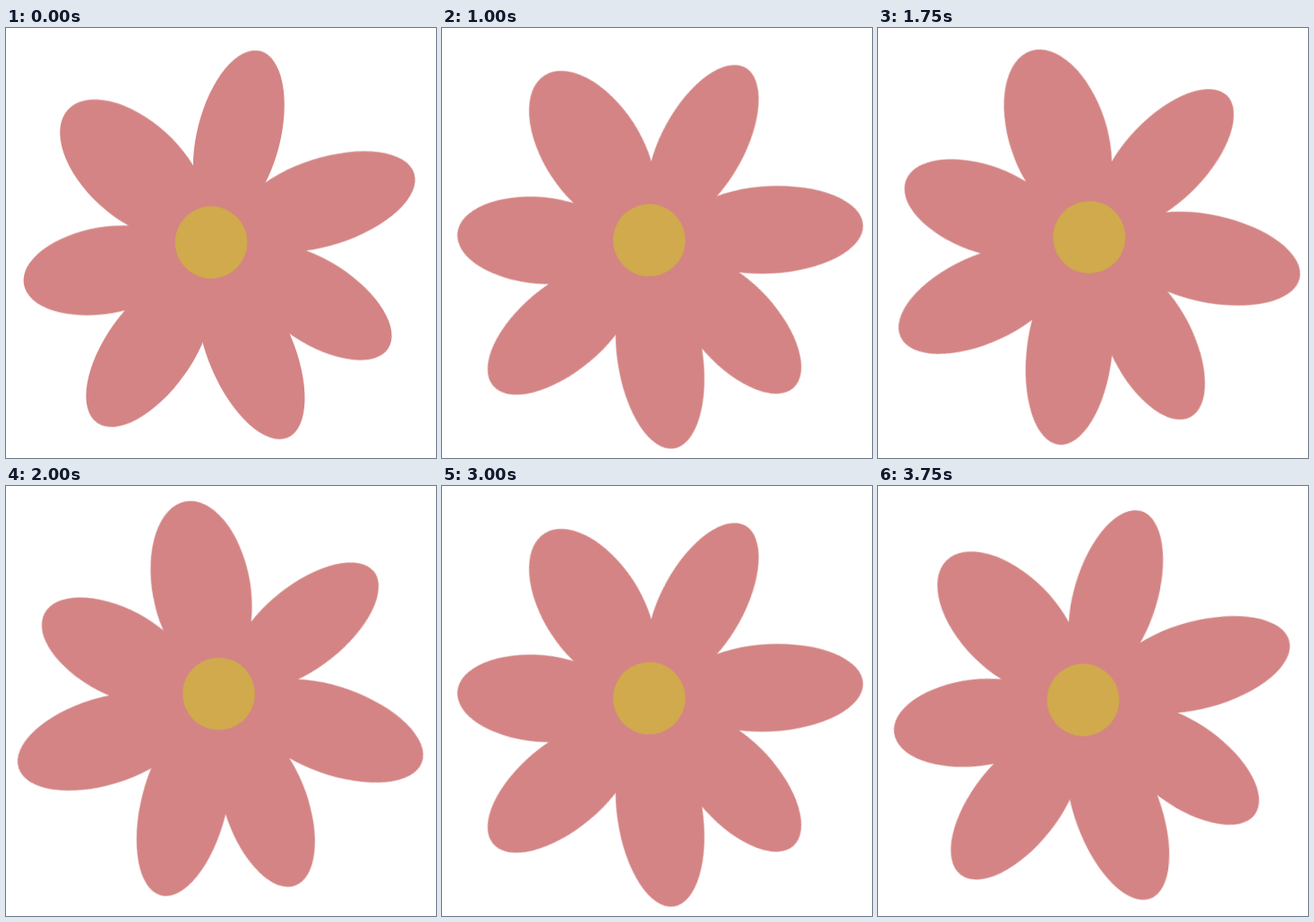
Recreate the animation shown at these times as an HTML page without scripts. Size 480 by 480 pixels, loop 4 s.

```html
<!DOCTYPE html>
<html lang="en">
<head>
<meta charset="utf-8">
<title>Swaying flower</title>
<style>
  html, body { margin: 0; width: 100%; height: 100%; overflow: hidden; background: #fff; }
  svg { display: block; width: 100%; height: 100%; }
  .petals { fill: #d48484; }
  .heart { fill: #d0aa4c; }

  /* Held poses: sway out for two seconds, then back the same way */
  .flower { animation: sway 4s step-end infinite; }
  @keyframes sway {
    0%             { transform: translate(229px, 239.3px) rotate(0deg); }
    6.25%, 93.75%  { transform: translate(229px, 238.8px) rotate(2.75deg); }
    12.5%, 87.5%   { transform: translate(229.6px, 238.2px) rotate(6.1deg); }
    18.75%, 81.25% { transform: translate(230.4px, 237.6px) rotate(10.1deg); }
    25%, 75%       { transform: translate(231.3px, 236.9px) rotate(14.7deg); }
    31.25%, 68.75% { transform: translate(232.7px, 236px) rotate(18.9deg); }
    37.5%, 62.5%   { transform: translate(234.2px, 235px) rotate(23.65deg); }
    43.75%, 56.25% { transform: translate(235.8px, 233.5px) rotate(29.8deg); }
    50%            { transform: translate(237.5px, 232px) rotate(37.4deg); }
  }
</style>
</head>
<body>
<svg viewBox="0 0 480 480">
  <g class="flower">
    <g class="petals">
      <circle r="84"/>
      <ellipse rx="104" ry="48.8" transform="translate(127.5 -45.5) rotate(-17.7)"/>
      <ellipse rx="95" ry="46.4" transform="translate(118 66.7) rotate(33)"/>
      <ellipse rx="104" ry="47.7" transform="translate(44.5 122.3) rotate(66.8)"/>
      <ellipse rx="100" ry="48.5" transform="translate(-69.4 119.9) rotate(125.5)"/>
      <ellipse rx="92" ry="48.4" transform="translate(-118.4 31.3) rotate(170.3)"/>
      <ellipse rx="98" ry="54.7" transform="translate(-87.4 -82.2) rotate(-137.8)"/>
      <ellipse rx="97.6" ry="46.5" transform="translate(30.8 -119) rotate(-75.9)"/>
    </g>
    <circle class="heart" r="40.4"/>
  </g>
</svg>
</body>
</html>
```
